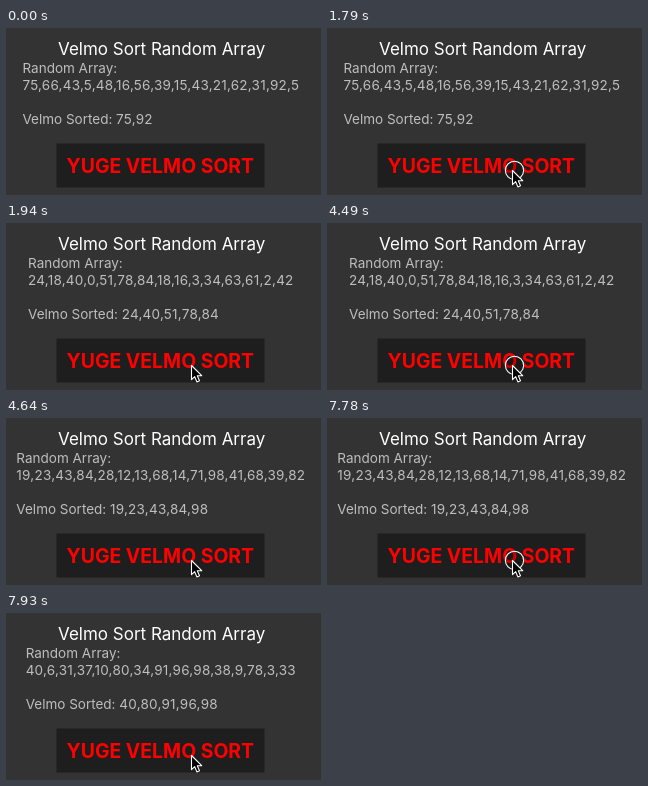
Animation, 315 px wide and 167 px high, one loop 8000 ms. Source, as an HTML page:

```html
<!DOCTYPE html>
<html lang="en">
<head>
<meta charset="utf-8">
<title>Velmo Sort</title>
<style>
html, body { margin: 0; width: 100%; height: 100%; overflow: hidden; background: #333; }
svg { display: block; width: 315px; height: 167px; }
text { font-family: Inter, Roboto, sans-serif; white-space: pre; }
.title { font-size: 17px; fill: #fff; text-anchor: end; }
#body { font-size: 13.5px; fill: #bebebe; }
.numbers { letter-spacing: .23px; }
.label { font-size: 19.4px; font-weight: 700; fill: #f00; text-anchor: middle; }
</style>
</head>
<body>
<svg viewBox="0 0 315 167">
  <rect width="315" height="167" fill="#333"/>
  <text class="title" x="259.3" y="27.4">Velmo Sort Random Array</text>
  <g id="body">
    <text y="45.4">Random Array:</text>
    <text y="62.2" class="numbers" id="list"></text>
    <text y="95.6">Velmo Sorted: <tspan class="numbers" id="sorted"></tspan></text>
  </g>
  <rect x="50.5" y="115.5" width="208" height="44" fill="#1e1e1e"/>
  <text class="label" x="154.3" y="145">YUGE VELMO SORT</text>
  <circle id="ring" cx="187.5" cy="142.4" r="9.1" fill="#000" fill-opacity=".2" stroke="#fff" stroke-width="1.1"/>
  <path id="arrow" d="M0 0V14.2L3.2 11.2L5.4 16.4L8 15.3L5.8 10.2H10.2Z" fill="#000" stroke="#fff" stroke-width="1.1" stroke-linejoin="round"/>
</svg>
<script>
const LOOP = 8000;
const CLICK_LENGTH = 150;
const CENTER = 154.8;
const ENTER = 890, SETTLE = 1040;
const $ = id => document.getElementById(id);

// each click ends by showing a new array
const runs = [
  { start: 0, list: '75,66,43,5,48,16,56,39,15,43,21,62,31,92,5' },
  { start: 1940, list: '24,18,40,0,51,78,84,18,16,3,34,63,61,2,42' },
  { start: 4640, list: '19,23,43,84,28,12,13,68,14,71,98,41,68,39,82' },
  { start: 7930, list: '40,6,31,37,10,80,34,91,96,98,38,9,78,3,33' }
];

// keep only values larger than everything before them
function dropSmaller(list) {
  let max = -1;
  return list.split(',').filter(n => +n > max && (max = +n, true)).join();
}

function showRun(run) {
  $('list').textContent = run.list;
  $('sorted').textContent = dropSmaller(run.list);
  const left = CENTER - $('list').getComputedTextLength() / 2;
  $('body').setAttribute('transform', `translate(${left} 0)`);
}

const toggle = (id, on) => $(id).style.display = on ? '' : 'none';

let shown;
function draw() {
  const t = performance.now() % LOOP;
  const run = runs.filter(r => r.start <= t).pop();
  if (run !== shown) showRun(shown = run);

  const next = runs[runs.indexOf(run) + 1];
  toggle('ring', next && t >= next.start - CLICK_LENGTH);

  toggle('arrow', t >= ENTER);
  const tip = t < SETTLE ? '185 148.5' : '185.5 142.5';
  $('arrow').setAttribute('transform', `translate(${tip})`);
  requestAnimationFrame(draw);
}
draw();
</script>
</body>
</html>
```
